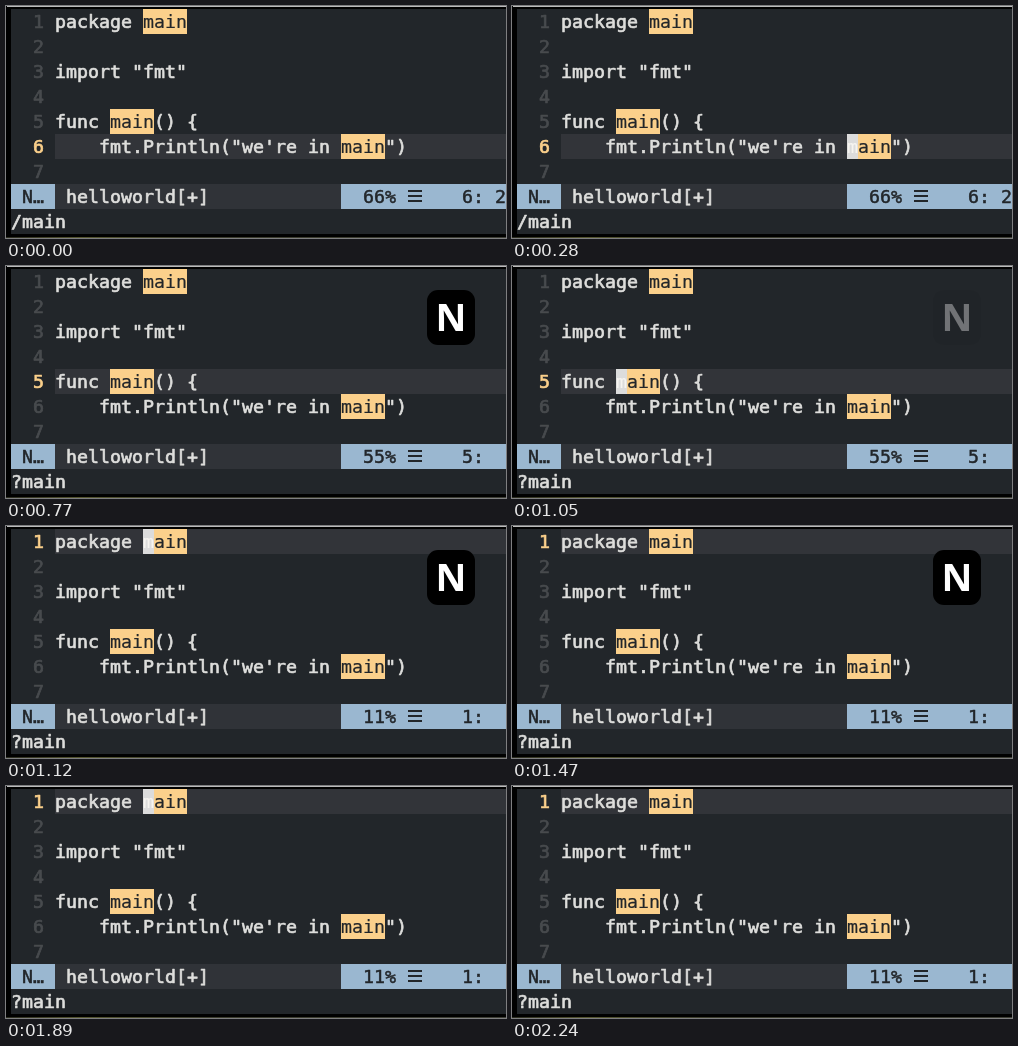
An HTML page with a canvas that plays this animation: 500 px wide and 232 px high, repeating every 2310 ms.

```html
<!DOCTYPE html>
<html lang="en">
<head>
<meta charset="utf-8">
<style>
  html, body { margin: 0; width: 100%; height: 100%; overflow: hidden; background: #000; }
  canvas { display: block; }
</style>
</head>
<body>
<canvas id="stage" width="500" height="232"></canvas>
<script>
const ctx = document.getElementById('stage').getContext('2d');

const LOOP = 2310, TICK = 70;
const CELL = 11, ROW = 25, LEFT = 5, TOP = 3, GUTTER = 4;
const MONO = '18.27px "DejaVu Sans Mono", monospace';
const C = {
  bg: '#22262a', line: '#323439', bar: '#303338', blue: '#9ab7d0',
  text: '#dededc', dim: '#484b4e', match: '#fbd08b', dark: '#22262a', cursor: '#dcdcdc'
};
const CODE = [
  'package main', '', 'import "fmt"', '', 'func main() {',
  '    fmt.Println("we\'re in main")', ''
];

// Where the editor stands after each search command
const VIEWS = [
  { from: 0, line: 6, percent: '66%', pos: '6: 2', command: '/main' },
  { from: 490, line: 5, percent: '55%', pos: '5:', command: '?main' },
  { from: 1120, line: 1, percent: '11%', pos: '1:', command: '?main' }
];

// [time, opacity] keys
const CURSOR = [
  [0, 0], [280, 1], [490, 1], [770, 0], [910, 0], [1050, 1], [1120, 1],
  [1400, 0], [1540, 0], [1680, 1], [2030, 1], [2240, 0], [2310, 0]
];
const BADGE = [
  [489, 0], [490, 1], [930, 1], [1119, 0], [1120, 1],
  [1480, 1], [1700, 0], [2310, 0]
];

function at(keys, t) {
  const i = keys.findIndex(k => k[0] >= t);
  if (i < 1) return keys[0][1];
  const [t0, v0] = keys[i - 1], [t1, v1] = keys[i];
  return v0 + (v1 - v0) * (t - t0) / (t1 - t0);
}

const colX = col => LEFT + col * CELL;
const rowY = row => TOP + row * ROW;

function rect(x, y, w, h, color) {
  ctx.fillStyle = color;
  ctx.fillRect(x, y, w, h);
}

function cells(col, row, count, color) {
  rect(colX(col), rowY(row), count * CELL, ROW, color);
}

// The thin outline gives the text its medium weight
function print(str, col, row, color, outline = 0.7) {
  ctx.font = MONO;
  ctx.lineJoin = 'round';
  ctx.lineWidth = outline;
  ctx.fillStyle = ctx.strokeStyle = color;
  ctx.fillText(str, colX(col), rowY(row) + 19);
  ctx.strokeText(str, colX(col), rowY(row) + 19);
}

function drawWindow() {
  rect(0, 0, 500, 232, '#000');
  rect(1, 0, 499, 1, '#bbb');
  rect(LEFT, TOP, 495, 225, C.bg);
  const desk = ctx.createLinearGradient(0, 0, 500, 0);
  desk.addColorStop(0, '#2a2b20');
  desk.addColorStop(0.15, '#54552f');
  desk.addColorStop(0.4, '#3a3b2c');
  desk.addColorStop(1, '#3c3d34');
  rect(0, 231, 500, 1, desk);
}

function drawCode(view, cursor) {
  CODE.forEach((str, row) => {
    const current = row + 1 === view.line;
    if (current) cells(GUTTER, row, 42, C.line);
    print(row + 1, 2, row, current ? C.match : C.dim);
    print(str, GUTTER, row, C.text);
    const hit = str.indexOf('main');
    if (hit < 0) return;
    const col = GUTTER + hit;
    cells(col, row, 4, C.match);
    print('main', col, row, C.dark, 0.2);
    if (!current) return;
    ctx.globalAlpha = cursor;
    cells(col, row, 1, C.cursor);
    print('m', col, row, '#f6f4f0', 0.2);
    ctx.globalAlpha = 1;
  });
}

function drawStatus(view) {
  cells(0, 7, 45, C.bar);
  cells(0, 7, 4, C.blue);
  cells(30, 7, 15, C.blue);
  print('N…', 1, 7, C.dark, 0.5);
  print('helloworld[+]', 5, 7, C.text);
  print(view.percent, 32, 7, C.dark, 0.5);
  for (const y of [184, 189, 194]) rect(402, y, 14, 2, C.dark);
  print(view.pos, 41, 7, C.dark, 0.5);
  print(view.command, 0, 8, C.text);
}

function drawBadge(alpha) {
  // The plate fades ahead of its letter
  ctx.globalAlpha = alpha ** 3;
  ctx.fillStyle = '#000';
  ctx.beginPath();
  ctx.roundRect(421, 24, 48, 55, 11);
  ctx.fill();
  ctx.globalAlpha = alpha;
  ctx.font = '600 38px "Noto Sans", "Open Sans", sans-serif';
  ctx.textAlign = 'center';
  ctx.fillStyle = '#fff';
  ctx.fillText('N', 445, 65);
  ctx.textAlign = 'left';
  ctx.globalAlpha = 1;
}

function frame() {
  const t = Math.floor(performance.now() % LOOP / TICK) * TICK;
  const view = VIEWS.findLast(v => v.from <= t);
  drawWindow();
  drawCode(view, at(CURSOR, t));
  drawStatus(view);
  drawBadge(at(BADGE, t));
  requestAnimationFrame(frame);
}
frame();
</script>
</body>
</html>
```
